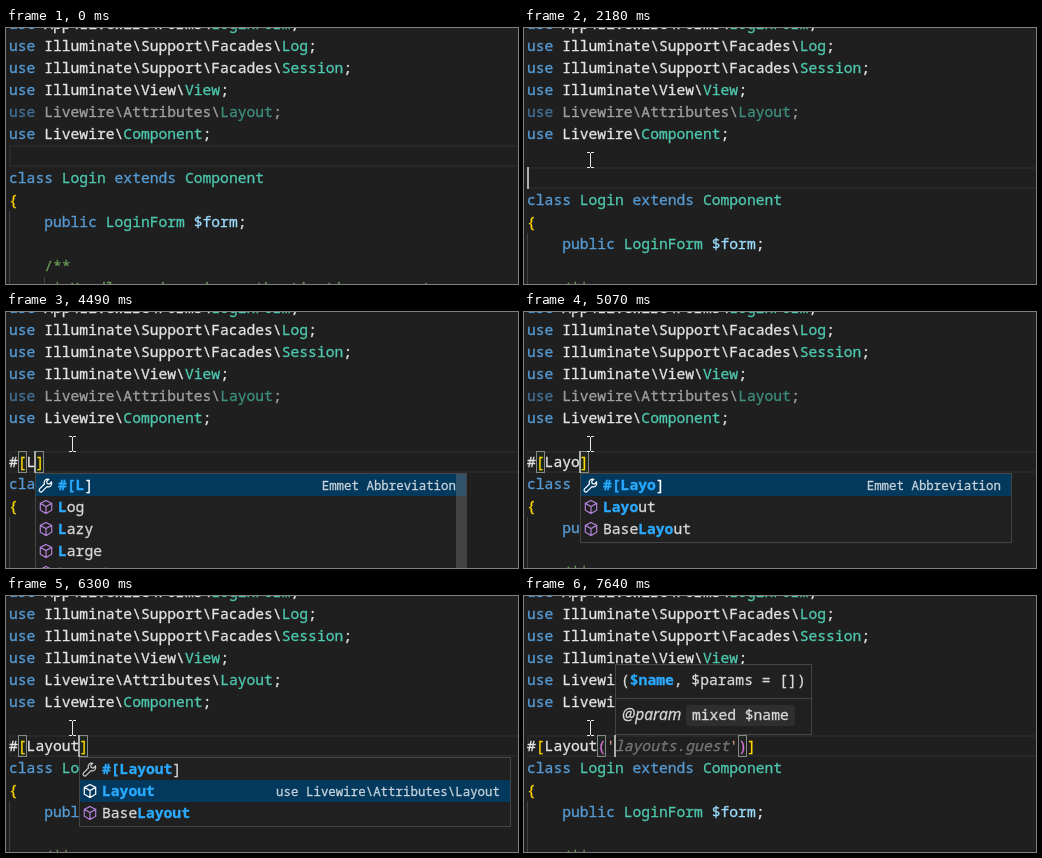
Write an HTML page with a canvas that moves like this. It is 512 px wide and 256 px high and loops after 8 s.

```html
<!DOCTYPE html>
<html lang="en">
<head>
<meta charset="utf-8">
<title>Code editor</title>
<style>
  html, body { margin: 0; width: 100%; height: 100%; overflow: hidden; background: #1f1f1f; }
  canvas { display: block; width: 512px; height: 256px; }
</style>
</head>
<body>
<canvas id="stage" width="512" height="256"></canvas>
<script>
const ctx = document.getElementById('stage').getContext('2d');
const LOOP = 8000, LEFT = 3, CHAR = 8.797, ROW = 22;
const MONO = '"Noto Sans Mono", monospace';
const CODE = `14.66px ${MONO}`, BOLD = `bold ${CODE}`, SMALL = `12.45px ${MONO}`;
const plain = '#e4e4e4', keyword = '#569cd6', type = '#4ec9b0', variable = '#9cdcfe',
      comment = '#6a9955', gold = '#ffd700', pink = '#da70d6', string = '#ce9178',
      match = '#2aaaff', border = '#454545', panel = '#202020', lineEdge = '#282828';

// Each entry changes part of the editor state at its time.
const timeline = [
  [0, { row: 5, attr: null, col: 0, caret: false, mouse: null, dim: true,
        list: null, selected: 0, hint: null, ghost: '' }],
  [530, { mouse: [86, 215] }],
  [660, { mouse: [94, 191] }],
  [800, { mouse: [118, 163] }],
  [920, { mouse: [95, 140] }],
  [1080, { mouse: [71, 131] }],
  [1230, { mouse: [63, 124] }],
  [1350, { caret: true }],
  [1900, { caret: false }],
  [2180, { row: 6, attr: '', caret: true }],
  [2730, { caret: false }],
  [2880, { attr: '#', col: 1, caret: true }],
  [3280, { caret: false }],
  [3840, { attr: '#[]', col: 2, caret: true }],
  [4240, { caret: false }],
  [4365, { attr: '#[L]', col: 3, caret: true }],
  [4490, { list: ['Log', 'Lazy', 'Large', 'Layout', 'Lang'] }],
  [4790, { attr: '#[La]', col: 4, list: ['Lazy', 'Large', 'Layout', 'Lang'] }],
  [5070, { attr: '#[Layo]', col: 6, list: ['Layout', 'BaseLayout'] }],
  [5190, { attr: '#[Layou]', col: 7 }],
  [5340, { attr: '#[Layout]', col: 8 }],
  [5880, { caret: false }],
  [6150, { dim: false }],
  [6300, { selected: 1, caret: true }],
  [6580, { attr: '#[Layout()]', col: 9, list: null }],
  [6710, { hint: 9 }],
  [7140, { ghost: "'components.layouts.guest'" }],
  [7260, { attr: "#[Layout('')]", col: 10, ghost: '' }],
  [7640, { hint: 10, ghost: 'layouts.guest' }]
];

const rowTop = row => 7 + row * ROW;
const colX = col => LEFT + col * CHAR;

function fill(x, y, w, h, color) {
  ctx.fillStyle = color;
  ctx.fillRect(x, y, w, h);
}

function box(x, y, w, h, color, edge) {
  fill(x, y, w, h, color);
  ctx.strokeStyle = edge;
  ctx.lineWidth = 1;
  ctx.strokeRect(x + .5, y + .5, w - 1, h - 1);
}

// A hairline stroke gives the glyphs a slightly heavier weight.
function text(str, x, y, color, font = CODE) {
  ctx.font = font;
  ctx.fillStyle = ctx.strokeStyle = color;
  ctx.lineWidth = .3;
  ctx.fillText(str, x, y);
  ctx.strokeText(str, x, y);
}

// Draws [text, color] pairs one after another on a row.
function codeLine(row, col, ...tokens) {
  for (const [str, color] of tokens) {
    text(str, colX(col), rowTop(row) + 16, color);
    col += str.length;
  }
}

function useLine(row, path, name, opacity = 1) {
  ctx.globalAlpha = opacity;
  codeLine(row, 0, ['use ', keyword], [path, plain], [name, type], [';', plain]);
  ctx.globalAlpha = 1;
}

function drawCode(s) {
  useLine(-1, 'App\\Livewire\\Forms\\', 'LoginForm');
  useLine(0, 'Illuminate\\Support\\Facades\\', 'Log');
  useLine(1, 'Illuminate\\Support\\Facades\\', 'Session');
  useLine(2, 'Illuminate\\View\\', 'View');
  useLine(3, 'Livewire\\Attributes\\', 'Layout', s.dim ? .6 : 1);
  useLine(4, 'Livewire\\', 'Component');

  const row = s.row + 1;
  codeLine(row, 0, ['class ', keyword], ['Login', type], [' extends ', keyword], ['Component', type]);
  codeLine(row + 1, 0, ['{', gold]);
  codeLine(row + 2, 4, ['public ', keyword], ['LoginForm', type], [' $form', variable], [';', plain]);
  codeLine(row + 4, 4, ['/**', comment]);
  codeLine(row + 5, 5, ['* Handle an incoming authentication request.', comment]);
  fill(LEFT, rowTop(row + 2), 1, 256, '#404040');
  fill(Math.round(colX(4)), rowTop(row + 5), 1, 256, '#404040');
}

function drawCurrentLine(top) {
  fill(LEFT, top, 512, ROW, lineEdge);
  fill(LEFT + 2, top + 2, 512, ROW - 4, '#1f1f1f');
}

function drawAttribute({ attr, col, row, ghost }) {
  const colors = { '[': gold, ']': gold, '(': pink, ')': pink, "'": string };
  const pair = attr.includes('(') ? '()' : '[]';
  [...attr].forEach((char, i) => {
    const at = i < col ? i : i + ghost.length;
    if (pair.includes(char))
      box(Math.round(colX(at)), rowTop(row), 9, ROW, 'rgba(0,100,0,.1)', '#888');
    codeLine(row, at, [char, attr === '#' ? comment : colors[char] || plain]);
  });
  text(ghost, colX(col), rowTop(row) + 16, 'rgba(255,255,255,.34)', `italic ${CODE}`);
}

const wrench = new Path2D('M13.5 5l-2 2-2.3-.4-.5-2.3 2-2C8 1.4 5.4 4 6.4 7L1.6 11.8a1.8 1.8 0 0 0 2.6 2.6L9 9.6c3 1 5.6-1.6 4.5-4.6z');
const cube = new Path2D('M8 1.5L13.7 4.4V11.2L8 14.5L2.3 11.2V4.4ZM2.3 4.4L8 7.5L13.7 4.4M8 7.5V14.5');

function icon(path, x, y, color) {
  ctx.save();
  ctx.translate(x, y);
  ctx.strokeStyle = color;
  ctx.lineWidth = 1.2;
  ctx.stroke(path);
  ctx.restore();
}

function drawSuggestions(s) {
  const typed = s.attr.slice(2, -1);
  const items = [s.attr, ...s.list];
  const x = Math.round(colX(s.col)), y = rowTop(s.row + 1);
  box(x, y, 432, items.length * ROW + 4, panel, border);

  items.forEach((name, i) => {
    const top = y + 1 + i * ROW, active = i === s.selected;
    const color = active ? '#fff' : '#d8d8d8';
    if (active) fill(x + 1, top, 430, ROW, '#04395e');
    icon(i ? cube : wrench, x + 3, top + 3, active ? '#fff' : i ? '#b180d7' : '#ccc');

    const from = i ? name.indexOf(typed) : 0;
    const to = from + (i ? typed.length : name.length - 1);
    const part = (a, b, c, font) => text(name.slice(a, b), x + 23 + a * CHAR, top + 16, c, font);
    part(0, from, color);
    part(from, to, match, BOLD);
    part(to, name.length, color);

    if (active) {
      ctx.textAlign = 'right';
      text(i ? 'use Livewire\\Attributes\\Layout' : 'Emmet Abbreviation',
           x + 421, top + 16, 'rgba(255,255,255,.72)', SMALL);
      ctx.textAlign = 'left';
    }
  });
  if (items.length > 3) fill(x + 421, y + 1, 10, 256, 'rgba(121,121,121,.4)');
}

function drawHint(col) {
  const x = Math.round(colX(col)), y = 68, ink = '#d8d8d8';
  box(x, y, 197, 71, panel, border);
  text('(', x + 6, y + 21, ink);
  text('$name', x + 6 + CHAR, y + 21, match, BOLD);
  text(', $params = [])', x + 6 + 6 * CHAR, y + 21, ink);
  fill(x + 1, y + 34, 195, 1, border);
  text('@param', x + 7, y + 56, ink, 'italic 15.6px "Open Sans", sans-serif');
  ctx.fillStyle = '#2e2e2e';
  ctx.beginPath();
  ctx.roundRect(x + 71, y + 41, 109, 21, 3);
  ctx.fill();
  text('mixed $name', x + 77, y + 56, ink);
}

function drawMouse([x, y]) {
  for (const edge of [y, y + 15]) {
    fill(x, edge, 3, 1, '#e8e8e8');
    fill(x + 4, edge, 3, 1, '#e8e8e8');
  }
  fill(x + 3, y + 1, 1, 14, '#e8e8e8');
}

function draw(time) {
  const s = Object.assign({}, ...timeline.filter(([at]) => at <= time).map(([, change]) => change));
  const top = rowTop(s.row);
  fill(0, 0, 512, 256, '#1f1f1f');
  drawCurrentLine(top);
  drawCode(s);
  if (s.attr) drawAttribute(s);
  if (s.caret) fill(s.col ? Math.round(colX(s.col) - 1) : LEFT, top, 2, ROW, '#aeafad');
  if (s.list) drawSuggestions(s);
  if (s.hint) drawHint(s.hint);
  if (s.mouse) drawMouse(s.mouse);
}

const start = performance.now();
function tick() {
  draw((performance.now() - start) % LOOP);
  requestAnimationFrame(tick);
}
tick();
</script>
</body>
</html>
```
